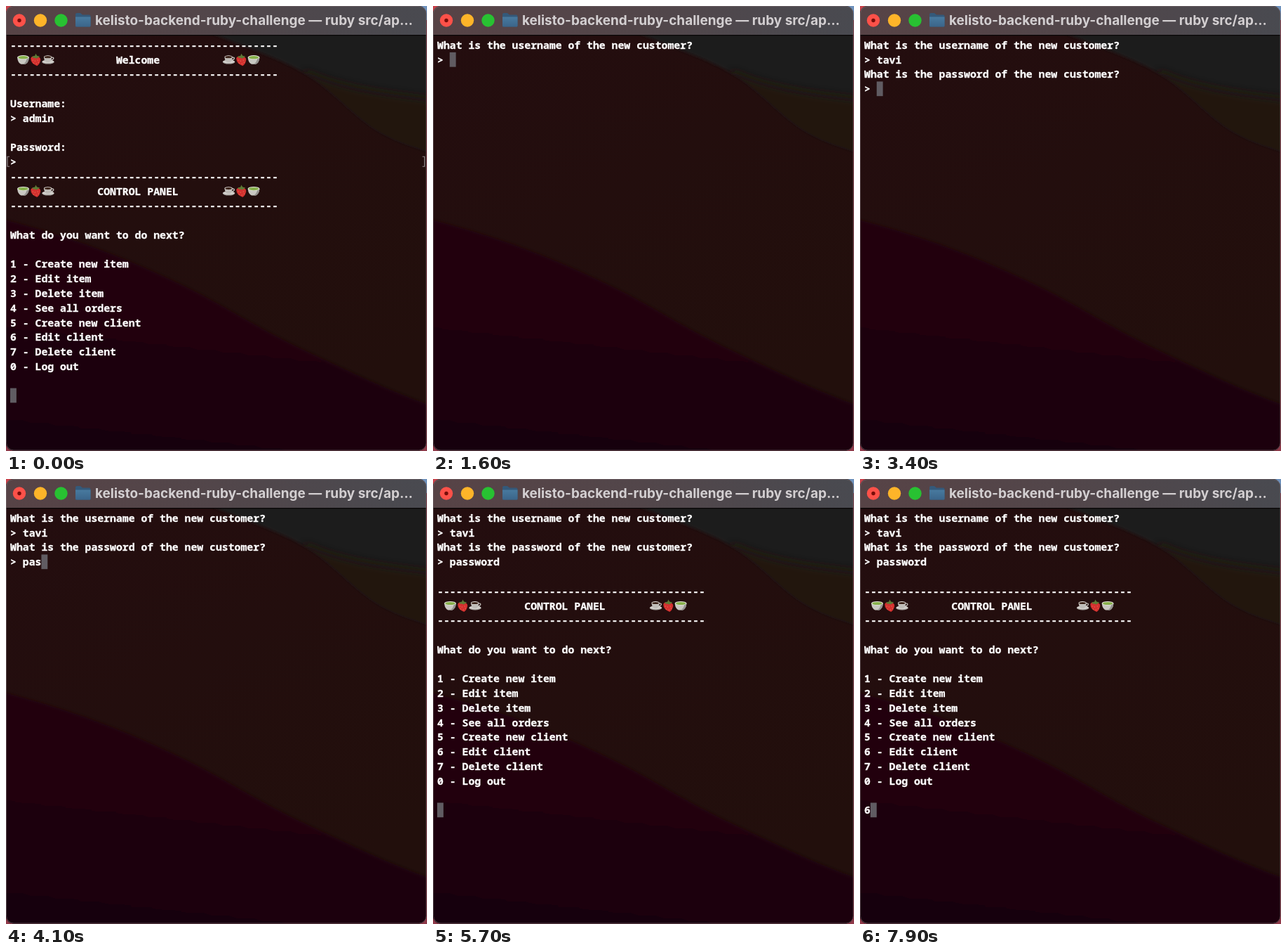
Recreate the animation shown at these times as an HTML page. Size 600 by 633 pixels, loop 8 s.

```html
<!DOCTYPE html>
<html lang="en">
<head>
<meta charset="utf-8">
<title>Terminal session</title>
<style>
  html, body { margin: 0; width: 100%; height: 100%; overflow: hidden; background: #8f3a4a; }
  svg { display: block; }
  #stage { width: 600px; height: 633px; }
  .title { font: 700 18.94px Inter, "Liberation Sans", sans-serif; fill: #d3cfd1; }
  #screen text {
    font: 600 14.8px "Noto Sans Mono", "DejaVu Sans Mono", monospace;
    fill: #fff; stroke: #fff; stroke-width: .3; white-space: pre;
  }
  .cursor { fill: #605c62; }
  .mark { fill: none; stroke: #91888b; stroke-width: 1.2; }
</style>
</head>
<body>
<svg id="stage" viewBox="0 0 600 633">
  <defs>
    <linearGradient id="outside" x2="1" y2="0">
      <stop offset="0" stop-color="#c9434c"/>
      <stop offset=".5" stop-color="#a5526a"/>
      <stop offset="1" stop-color="#6f93bd"/>
    </linearGradient>
    <linearGradient id="bar" x2="1" y2="0">
      <stop offset="0" stop-color="#574346"/>
      <stop offset=".5" stop-color="#52464a"/>
      <stop offset="1" stop-color="#494a50"/>
    </linearGradient>
    <linearGradient id="hill" x2=".6" y2="1">
      <stop offset="0" stop-color="#240d0f"/>
      <stop offset="1" stop-color="#220f0c"/>
    </linearGradient>
    <linearGradient id="valley" x1=".5" y1="0" x2=".3" y2="1">
      <stop offset="0" stop-color="#25000b"/>
      <stop offset=".45" stop-color="#21000f"/>
      <stop offset="1" stop-color="#180211"/>
    </linearGradient>
    <linearGradient id="folder" x2="0" y2="1">
      <stop offset="0" stop-color="#487a9f"/>
      <stop offset="1" stop-color="#3b658a"/>
    </linearGradient>
    <filter id="soft" x="-5%" y="-5%" width="110%" height="110%"><feGaussianBlur stdDeviation="2"/></filter>
    <filter id="haze" x="-20%" y="-20%" width="140%" height="140%"><feGaussianBlur stdDeviation="7"/></filter>
    <clipPath id="window"><rect width="599" height="632.5" rx="11"/></clipPath>
    <clipPath id="skyline"><path id="ridge" d="M270 30C350 62 400 78 438 103C475 128 500 160 535 180C560 194 580 199 610 209V30Z"/></clipPath>

    <symbol id="tea" viewBox="0 0 18 18" overflow="visible">
      <path d="M.6 5.5Q1.5 13.5 6 15H12Q16.5 13.5 17.4 5.5Z" fill="#c9c8c2"/>
      <path d="M12 15Q16.5 13.5 17.4 5.5H14.5Q14 12 9 15Z" fill="#94938f"/>
      <ellipse cx="9" cy="5.3" rx="8.4" ry="2.9" fill="#e4e5dc"/>
      <ellipse cx="9" cy="5.5" rx="7.2" ry="2.1" fill="#86b04a"/>
    </symbol>
    <symbol id="berry" viewBox="0 0 18 18" overflow="visible">
      <path d="M2 7Q3 3 9 4Q16 4 16 9Q15 15 11 17.5Q2 14 2 7Z" fill="#d4302f"/>
      <path d="M4 4L8 3L9 0L11 3L15 4L12 6L10 7L8 6L5 6Z" fill="#5d7a35"/>
      <path d="M5 9v1M8 10v1M12 9v1M6 13v1M10 14v1M13 12v1" stroke="#f2a06c" stroke-width=".8"/>
    </symbol>
    <symbol id="coffee" viewBox="0 0 18 18" overflow="visible">
      <ellipse cx="9" cy="12" rx="8.8" ry="2.9" fill="#a09d9a"/>
      <ellipse cx="9" cy="11.4" rx="8.4" ry="2.3" fill="#d3d0cc"/>
      <path d="M13.5 5.5Q17.5 5 16.7 7.5Q15.5 9.6 12 9.6" fill="none" stroke="#c9c6c2" stroke-width="1.3"/>
      <path d="M3 5Q3.4 11.4 7 12.4H10.4Q13.8 11.4 14.2 5Z" fill="#bfbcb8"/>
      <ellipse cx="8.6" cy="4.8" rx="5.7" ry="2.2" fill="#e6e3df"/>
      <ellipse cx="8.6" cy="5" rx="4.8" ry="1.6" fill="#3a2218"/>
    </symbol>
  </defs>

  <rect width="600" height="633" fill="#8f3a4a"/>
  <rect width="600" height="20" fill="url(#outside)"/>
  <g clip-path="url(#window)">
    <rect width="600" height="633" fill="url(#hill)"/>
    <use href="#ridge" fill="#1d1c1f" filter="url(#soft)"/>
    <g clip-path="url(#skyline)">
      <path d="M425 92C480 118 540 124 620 134V220H425Z" fill="#21190f" filter="url(#haze)"/>
    </g>
    <path d="M-10 302C80 325 150 350 225 385C300 418 350 455 430 492C490 520 540 545 610 570V643H-10Z" fill="url(#valley)" filter="url(#soft)"/>
    <rect width="600" height="41" fill="url(#bar)"/>
    <rect y="41" width="600" height="1.2" fill="#080506"/>
  </g>
  <rect x=".5" y=".5" width="598.5" height="631.5" rx="10.5" fill="none" stroke="#77696e" stroke-opacity=".65"/>

  <circle cx="19" cy="20.5" r="9.2" fill="#fe5149"/>
  <circle cx="19" cy="20.5" r="2.7" fill="#780d09"/>
  <circle cx="49" cy="20.5" r="9.2" fill="#feb429"/>
  <circle cx="78.5" cy="20.5" r="9.2" fill="#28c132"/>
  <path d="M99 12Q99 10 101 10H106L109 12.5H118.5Q120.5 12.5 120.5 14.5V28Q120.5 29.5 119 29.5H100.5Q99 29.5 99 28Z" fill="#34597a"/>
  <path d="M99 15.5H120.5V28Q120.5 29.5 119 29.5H100.5Q99 29.5 99 28Z" fill="url(#folder)"/>
  <text class="title" x="127" y="27">kelisto-backend-ruby-challenge — ruby src/ap...</text>

  <g id="screen"></g>
</svg>
<script>
const LOOP = 8000, LEFT = 6, TOP = 45.1, COL = 8.88, ROW = 20.77;
const USER = "tavi", PASS = "password";
const screen = document.getElementById("screen");

const rule = "-".repeat(43);
const banner = (label, col) => [rule, { label, col }, rule];
const panel = [
  ...banner("CONTROL PANEL", 14), "", "What do you want to do next?", "",
  "1 - Create new item", "2 - Edit item", "3 - Delete item", "4 - See all orders",
  "5 - Create new client", "6 - Edit client", "7 - Delete client", "0 - Log out", ""
];
const login = [...banner("Welcome", 17), "", "Username:", "> admin", "", "Password:", { label: ">", col: 0, marks: true }];
const askName = "What is the username of the new customer?";
const askPass = "What is the password of the new customer?";

// Key press times in ms
const nameKeys = [2000, 2200, 2400, 2600];
const passKeys = [3700, 3850, 4050, 4300, 4500, 4700, 4850, 5000];
const typed = (word, keys, t) => word.slice(0, keys.filter(k => k <= t).length);

// The last line always carries the cursor.
function linesAt(t) {
  if (t < 1300) return [...login, ...panel, typed("5", [800], t)];
  const name = [askName, "> " + typed(USER, nameKeys, t)];
  if (t < 3100) return name;
  const both = [...name, askPass, "> " + typed(PASS, passKeys, t)];
  if (t < 5700) return both;
  return [...both, "", ...panel, typed("6", [7400], t)];
}

function add(tag, attrs, text = "") {
  const el = document.createElementNS("http://www.w3.org/2000/svg", tag);
  for (const key in attrs) el.setAttribute(key, attrs[key]);
  el.textContent = text;
  screen.append(el);
}

const xAt = col => LEFT + col * COL;
const write = (text, col, y) => add("text", { x: xAt(col), y: y + 15.8 }, text);

function drawIcons(y) {
  const icons = ["tea", "berry", "coffee"];
  const put = (icon, col) => add("use", { href: "#" + icon, x: xAt(col) + .6, y: y + 1.8, width: 18, height: 18 });
  icons.forEach((icon, i) => {
    put(icon, 1 + 2 * i);
    put(icon, 38 - 2 * i);
  });
}

function draw(lines) {
  screen.replaceChildren();
  lines.forEach((line, i) => {
    const y = TOP + i * ROW;
    if (typeof line === "string") {
      if (line) write(line, 0, y);
      return;
    }
    write(line.label, line.col, y);
    if (line.marks) add("path", { class: "mark", d: `M5 ${y + 3}H2V${y + 17}H5M593.5 ${y + 3}H596.5V${y + 17}H593.5` });
    else drawIcons(y);
  });
  const last = lines.length - 1;
  add("rect", { class: "cursor", x: xAt(lines[last].length), y: TOP + last * ROW, width: COL, height: ROW });
}

let shown = "";
const start = performance.now();
function tick(now) {
  const lines = linesAt(Math.max(0, now - start) % LOOP);
  const key = JSON.stringify(lines);
  if (key !== shown) {
    draw(lines);
    shown = key;
  }
  requestAnimationFrame(tick);
}
tick(start);
</script>
</body>
</html>
```
